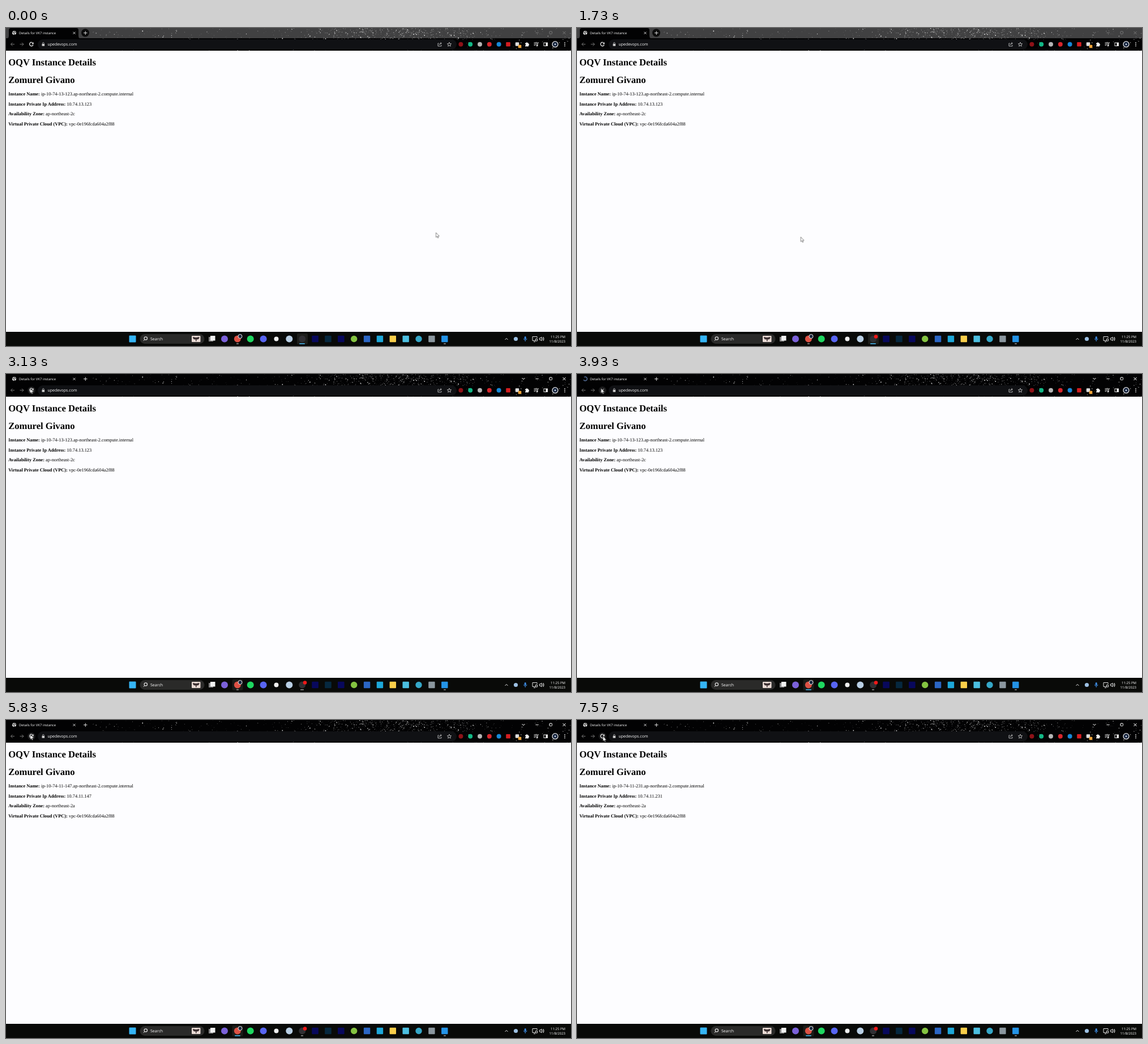
An HTML page with a canvas for the animation above (8000 ms loop, 998 by 561 pixels).

```html
<!DOCTYPE html>
<html lang="en">
<head>
<meta charset="utf-8">
<title>Instance details</title>
<style>
html, body { margin: 0; width: 100%; height: 100%; overflow: hidden; background: #fdfdff; }
canvas, svg { position: absolute; left: 0; top: 0; display: block; }
text { text-rendering: geometricPrecision; white-space: pre; }
.ui { font-family: "Open Sans", "Noto Sans", sans-serif; fill: #fff; }
.serif { font-family: "Liberation Serif", serif; font-size: 8.32px; fill: #000; }
.b { font-weight: bold; }
.line { fill: none; stroke: #dedede; stroke-width: 1; }
.dim { stroke: #777; }

.idle, .live, .dot, .page, .stop, .reload, .spin, .globe { animation: 8s step-end infinite; }
.idle { animation-name: idle; }
.live { animation-name: live; }
.dot { animation-name: dot; }
.stop { animation-name: stop; }
.reload { animation-name: reload; }
.p0 { animation-name: p0; }
.p1 { animation-name: p1; }
.p2 { animation-name: p2; }
.p3 { animation-name: p3; }
.spin { animation-name: busy; }
.globe { animation-name: ready; }
.turn { animation: turn .8s linear infinite; transform-origin: 14.5px 8.5px; }
.tip { animation: tip 8s linear infinite; }
.hover { animation: hover 8s linear infinite; }
.cursor { animation: cursor 8s linear infinite; }
.barA { animation: barA 8s linear infinite; transform-origin: 409px 557px; }
.barB { animation: barB 8s linear infinite; transform-origin: 523px 557px; }

@keyframes idle { 0% { opacity: 1 } 39.1%, 100% { opacity: 0 } }
@keyframes live { 0% { opacity: 0 } 39.1%, 100% { opacity: 1 } }
@keyframes dot { 0% { opacity: 0 } 2.9%, 100% { opacity: 1 } }
@keyframes p0 { 0% { opacity: 1 } 52.2%, 100% { opacity: 0 } }
@keyframes p1 { 0% { opacity: 0 } 52.2% { opacity: 1 } 78.8%, 100% { opacity: 0 } }
@keyframes p2 { 0% { opacity: 0 } 78.8% { opacity: 1 } 93.8%, 100% { opacity: 0 } }
@keyframes p3 { 0% { opacity: 0 } 93.8%, 100% { opacity: 1 } }
@keyframes stop { 0% { opacity: 0 } 45.4% { opacity: 1 } 69.1%, 100% { opacity: 0 } }
@keyframes reload { 0% { opacity: 1 } 45.4% { opacity: 0 } 69.1%, 100% { opacity: 1 } }
@keyframes busy {
  0% { opacity: 0 } 40% { opacity: 1 } 52.2% { opacity: 0 }
  73.2% { opacity: 1 } 79.2% { opacity: 0 } 88.7% { opacity: 1 } 94.2%, 100% { opacity: 0 }
}
@keyframes ready {
  0% { opacity: 1 } 40% { opacity: 0 } 52.2% { opacity: 1 }
  73.2% { opacity: 0 } 79.2% { opacity: 1 } 88.7% { opacity: 0 } 94.2%, 100% { opacity: 1 }
}
@keyframes turn { to { transform: rotate(360deg) } }
@keyframes tip { 0%, 59.6% { opacity: 0 } 59.62%, 66.2% { opacity: 1 } 69.1%, 100% { opacity: 0 } }
@keyframes hover { 0%, 33.5% { opacity: 0 } 35.5%, 100% { opacity: 1 } }
@keyframes barA { 0%, 39.1% { transform: scaleX(.4); fill: #9a9a9a } 42%, 100% { transform: none; fill: #4cc2ff } }
@keyframes barB {
  0%, 39.1% { transform: none; fill: #4cc2ff }
  39.12% { transform: scaleX(.7); fill: #9a9a9a }
  42%, 100% { transform: scaleX(.4); fill: #9a9a9a }
}
@keyframes cursor {
  0%, .4% { transform: translate(759.5px, 361px); animation-timing-function: ease-out }
  10.6% { transform: translate(493.5px, 374px) }
  12.9% { transform: translate(468.5px, 375px) }
  20.9% { transform: translate(402px, 373px); animation-timing-function: ease-in-out }
  28.4% { transform: translate(45.5px, 141.5px) }
  31.4% { transform: translate(45px, 58px); animation-timing-function: ease-out }
  36.2%, 49% { transform: translate(42.5px, 25.5px) }
  52.8%, 72.9% { transform: translate(43px, 26px) }
  77%, 100% { transform: translate(46px, 29px) }
}
</style>
</head>
<body>
<canvas id="sky" width="998" height="40"></canvas>
<svg width="998" height="561" viewBox="0 0 998 561">
  <!-- title bar -->
  <g class="idle">
    <path fill="#fff" fill-opacity=".25" fill-rule="evenodd"
      d="M0 0H998V18H0ZM3 18Q5 17 5 14V4Q5 0 9 0H124Q128 0 128 4V14Q128 17 130 18Z"/>
    <circle cx="140" cy="8.5" r="7" fill="#0b0b0b"/>
  </g>
  <g class="line dim"><use href="#controls"/></g>
  <g class="live line"><g id="controls">
    <path d="M911.5 7L914 9.5L916.5 7M935.5 8.5H940.5M983.5 6L988.5 11M988.5 6L983.5 11"/>
    <rect x="960" y="6" width="4.5" height="4.5" rx="1"/>
  </g></g>
  <g class="globe">
    <circle cx="14.5" cy="8.5" r="3.6" fill="#d8d8d8"/>
    <path d="M11.5 7.5Q14 7 14 9T16 11.5M14.5 5.5Q15 8 17.5 7.5" fill="none" stroke="#222" stroke-width="1.1"/>
  </g>
  <g class="spin"><path class="turn" d="M14.5 5A3.5 3.5 0 1 1 11 8.5" fill="none" stroke="#8ab4f8"/></g>
  <text class="ui" x="23" y="11" font-size="5.92">Details for VK7 instance</text>
  <path class="line" d="M118.5 6.8L122.5 10.8M122.5 6.8L118.5 10.8M137 8.7H143.5M140.25 5.5V12"/>

  <!-- toolbar -->
  <rect x="56" y="20" width="740" height="18" rx="9" fill="#101114"/>
  <path class="line dim" d="M15 28.7H8.5M11.5 25.7L8.5 28.7L11.5 31.7M24.5 28.7H31M28 25.7L31 28.7L28 31.7"/>
  <circle class="hover" cx="45" cy="28.8" r="6.8" fill="#fff" fill-opacity=".1"/>
  <g class="reload">
    <path d="M47.6 26.6A3.3 3.3 0 1 0 48 29.7" fill="none" stroke="#eee" stroke-width="1.2"/>
    <path d="M48.6 25V28.4H45.2Z" fill="#eee"/>
  </g>
  <path class="stop line" d="M42.3 26L47.7 31.5M47.7 26L42.3 31.5"/>
  <rect x="63.5" y="28" width="4.6" height="3.8" rx=".5" fill="#ccc"/>
  <path class="line" style="stroke-width:.7" d="M64.5 28V26.8A1.3 1.3 0 0 1 67.1 26.8V28"/>
  <text class="ui" x="73.5" y="31.2" font-size="7">upedevops.com</text>
  <path class="line" style="stroke-width:.8" d="M764.5 27H763V32H769V30M765 30Q765.5 27 769 27M767.3 25L769.3 27L767.3 29M783 25.2L784 27.7L786.6 27.9L784.6 29.6L785.3 32.2L783 30.8L780.7 32.2L781.4 29.6L779.4 27.9L782 27.7Z"/>
  <g id="extensions"></g>
  <path fill="#eee" d="M917 26.5H918.8A1.2 1.2 0 0 1 921.2 26.5H923V28.3A1.2 1.2 0 0 1 923 30.7V32.5H917V30.7A1.2 1.2 0 0 0 917 28.3Z"/>
  <path class="line" d="M932.5 26H938.5M932.5 28.3H938.5M932.5 30.6H935.5M939 31V26H941"/>
  <circle cx="938" cy="31" r="1.3" fill="#eee"/>
  <rect class="line" x="950" y="26" width="6.5" height="5.5"/>
  <rect x="953.5" y="26" width="3" height="5.5" fill="#eee"/>
  <circle cx="970" cy="28.7" r="5" fill="#17243c" stroke="#e8e8e8" stroke-width="1.3"/>
  <circle cx="970" cy="28.7" r="1.5" fill="#b9c7dc"/>
  <path d="M987 25.8V31.8" stroke="#eee" stroke-width="1.8" stroke-linecap="round" stroke-dasharray="0 2.9"/>

  <!-- page -->
  <rect y="40" width="998" height="496" fill="#fdfdff"/>
  <g class="serif">
    <g class="b" font-size="16.63">
      <text x="4.16" y="66.3">OQV Instance Details</text>
      <text x="4.16" y="96.8">Zomurel Givano</text>
    </g>
    <g id="details"></g>
    <text x="4.16" y="172.2"><tspan class="b">Virtual Private Cloud (VPC):</tspan> vpc-0e196fcda604a2f88</text>
  </g>
  <g class="tip">
    <rect x="48.5" y="34.5" width="70" height="11.5" fill="#191919" stroke="#555" stroke-width=".8"/>
    <text class="ui" x="52" y="42.5" font-size="6.1">Stop loading this page</text>
  </g>

  <!-- taskbar -->
  <rect y="536" width="998" height="25" fill="#090a08"/>
  <rect class="idle" x="514" y="539" width="19" height="19" rx="2" fill="#1d1e1b"/>
  <rect class="live" x="399.5" y="539" width="19" height="19" rx="2" fill="#1b1c19"/>
  <rect x="236.5" y="540" width="114" height="17" rx="8.5" fill="#2a2a29"/>
  <circle class="line" cx="246.8" cy="547.5" r="2.7" style="stroke-width:1.2"/>
  <path class="line" d="M244.8 549.7L242.7 552"/>
  <text class="ui" x="255" y="551.2" font-size="7">Search</text>
  <rect x="328" y="543" width="15.5" height="11" rx="1" fill="#eadbd5"/>
  <path d="M335.7 546L330 545Q330 550 335 549.5V552.5H336.5V549.5Q341.5 550 341.5 545Z" fill="#3c3032"/>
  <g id="apps"></g>
  <rect x="358" y="545" width="8" height="8" fill="#858585"/>
  <rect x="361" y="543" width="8.5" height="8.5" fill="#f1f1f1"/>
  <circle cx="413.5" cy="544" r="3.5" fill="#17243c" stroke="#eee"/>
  <circle class="dot" cx="528" cy="544.5" r="3.3" fill="#f01818"/>
  <rect class="barA" x="404" y="556.3" width="10" height="1.5" rx=".7"/>
  <rect class="barB" x="518" y="556.3" width="10" height="1.5" rx=".7"/>
  <rect x="773" y="556.3" width="4" height="1.5" rx=".7" fill="#9a9a9a"/>
  <path class="line" d="M881.5 550L884 547.3L886.5 550"/>
  <rect x="915.7" y="544" width="3" height="5.5" rx="1.5" fill="#3d8be0"/>
  <path class="line" style="stroke:#3d8be0" d="M914.3 548A3 3 0 0 0 920.2 548M917.2 551V553"/>
  <path class="line" d="M935 551.5H930V544.5H938V547M932 553.5H935M935.5 548.5H938.5V552H935.5Z"/>
  <path class="line" d="M942.3 547H944L946 545V552L944 550H942.3ZM947.8 546.5Q949.3 548.5 947.8 550.5M949 545Q951.5 548.5 949 552"/>
  <g class="ui" font-size="6" text-anchor="end">
    <text x="988" y="546.8">11:25 PM</text>
    <text x="988" y="555">11/8/2023</text>
  </g>

  <path class="cursor" d="M0 0V8.3L1.9 6.6L3.2 9.5L4.5 8.9L3.2 6.1H5.8Z" fill="#fff" stroke="#333" stroke-width=".6"/>
</svg>
<script>
const put = (id, items) => document.getElementById(id).innerHTML = items.join('');
const disc = (x, y, r, color) => `<circle cx="${x}" cy="${y}" r="${r}" fill="${color}"/>`;
const square = (x, y, r, color) => `<rect x="${x - r}" y="${y - r}" width="${2 * r}" height="${2 * r}" rx="1" fill="${color}"/>`;

put('extensions', [
  ...['#8e1218', '#12b886', '#b5b5b5', '#d8262c', '#1689d8'].map((c, i) => disc(803.4 + i * 16.8, 28.7, 4, c)),
  square(887, 28.7, 3.8, '#d31d20'), square(903, 28.5, 3.2, '#dedede'), square(907.5, 32.5, 2.8, '#f0a63a')
]);

const round = ['#7b61d9', '#dd5144', '#1ed760', '#5865f2', '#efefef', '#b9cfe4', '#302f33'];
const boxed = ['#08085c', '#06283f', '#08085c'];
const rest = ['#84c341', '#2b66c4', '#1da7d8', '#f8ce4a', '#4cbfe0', '#35a7c7', '#8b979f', '#2493e6'];
const slot = i => 386 + i * 22.87;
put('apps', [
  square(223.5, 548.5, 6, '#35b5f5'),
  ...round.map((c, i) => disc(slot(i), 548.5, i === 4 ? 4 : 6, c)),
  ...boxed.map((c, i) => square(slot(i + 7), 548.5, 5.8, c)),
  ...rest.map((c, i) => (i % 5 ? square : disc)(slot(i + 10), 548.5, 5.7, c)),
  disc(900.5, 548.5, 3.6, '#9dc0e2')
]);

const row = (y, label, value) => `<text x="4.16" y="${y}"><tspan class="b">${label}:</tspan> ${value}</text>`;
const hosts = [['10.74.13.123', 'c'], ['10.74.11.147', 'a'], ['10.74.13.152', 'c'], ['10.74.11.231', 'a']];
put('details', hosts.map(([ip, zone], i) => `<g class="page p${i}">` +
  row(119.2, 'Instance Name', `ip-${ip.replaceAll('.', '-')}.ap-northeast-2.compute.internal`) +
  row(136.9, 'Instance Private Ip Address', ip) +
  row(154.4, 'Availability Zone', 'ap-northeast-2' + zone) + '</g>'));

// Starry window frame, denser right of the middle
let seed = 41;
const random = () => (seed = seed * 16807 % 2147483647) / 2147483647;
const sky = document.getElementById('sky').getContext('2d');
sky.fillStyle = '#020203';
sky.fillRect(0, 0, 998, 40);
for (let i = 0; i < 850; i++) {
  const cluster = random() < 0.5;
  const x = cluster ? 690 + (random() + random() + random() - 1.5) * 160 : 150 + random() * 848;
  const y = random() * (cluster ? 20 : 40);
  const size = 0.6 + random() ** 3;
  sky.fillStyle = `rgba(255,255,255,${0.25 + 0.75 * random() ** 2})`;
  sky.fillRect(x, y, size, size);
}
</script>
</body>
</html>
```
